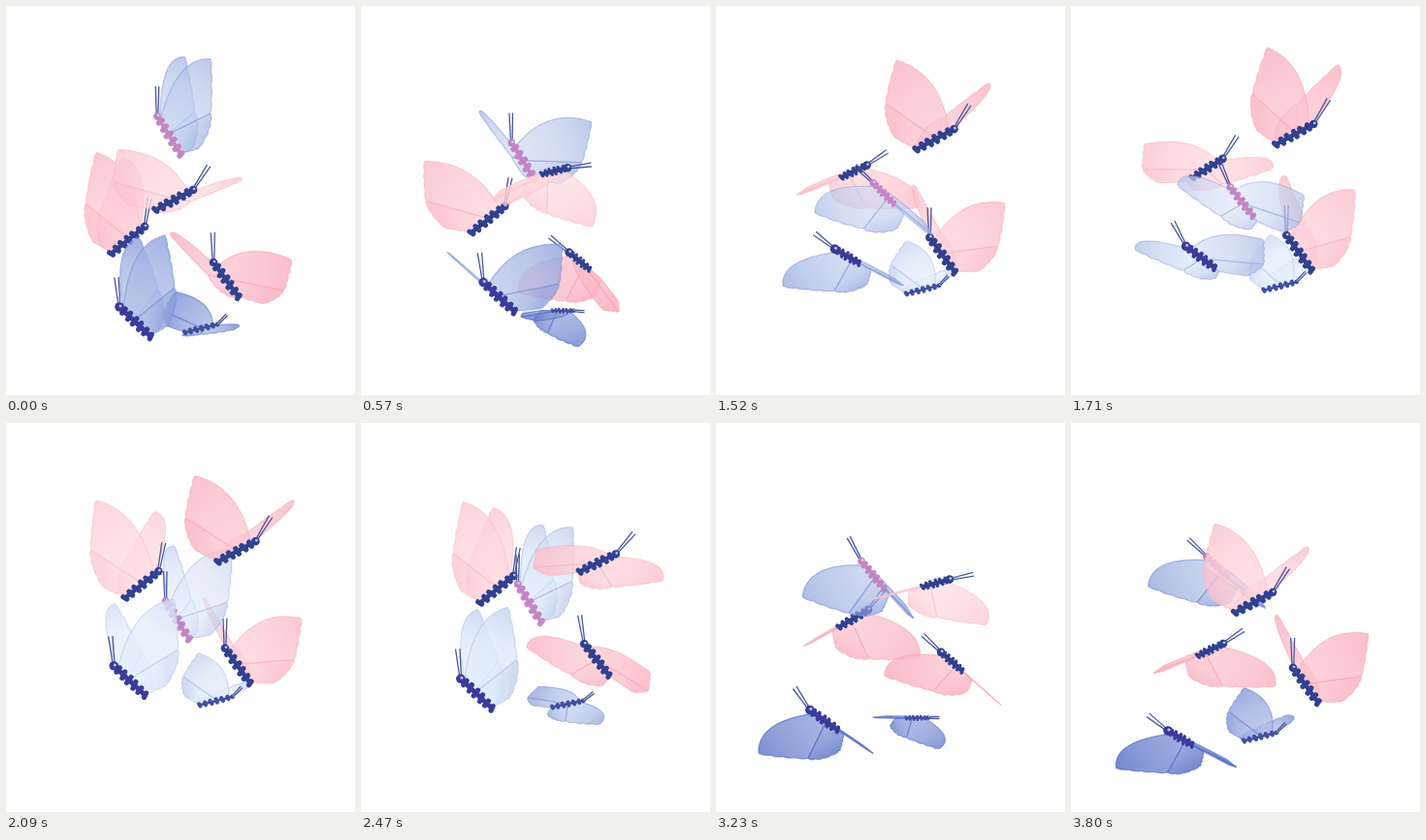
Write an HTML page with a canvas that moves like this. It is 360 px wide and 402 px high and loops after 3990 ms.

```html
<!DOCTYPE html>
<html lang="en">
<head>
<meta charset="utf-8">
<title>Butterflies</title>
<style>
  html, body { margin: 0; width: 100%; height: 100%; overflow: hidden; background: #fff; }
  canvas { display: block; width: 360px; height: 402px; }
</style>
</head>
<body>
<canvas id="stage" width="360" height="402"></canvas>
<script>
const ctx = document.getElementById('stage').getContext('2d');
const STEP = 190, STEPS = 21, BEAT = 12, TAU = Math.PI * 2;
const PINK = [[255, 228, 232], [246, 146, 166]];
const BLUE = [[228, 238, 251], [72, 98, 192]];
const NAVY = '#2f4190';

// Two ways of flapping: step of the highest point, mean angle and swing in radians.
const wide = { peak: 0.4, mean: 0.24, swing: 1.15 };
const calm = { peak: 9.4, mean: 0.08, swing: 0.93 };

// dir: side the tail points to. side and up: wing directions when flat and raised.
// path: head positions, five steps apart.
const flies = [
  { hue: BLUE, shade: 0.44, gain: 0.22, body: '#40509f', dir: -1, len: 36, slope: 0.25, width: 5,
    feeler: 14, lean: 0.75, beat: calm, side: [31, 19], up: [4, -40],
    path: [[218, 329], [221, 304], [234, 283], [224, 294], [212, 320]] },
  { hue: PINK, shade: 0.4, gain: 0.1, body: NAVY, dir: -1, len: 46, slope: 0.68, width: 9,
    feeler: 30, lean: 0.17, beat: wide, side: [64, 12], up: [-23, -72],
    path: [[143, 228], [152, 190], [157, 154], [157, 170], [157, 228]] },
  { hue: PINK, shade: 0.52, gain: 0.08, body: NAVY, dir: 1, len: 46, slope: 0.95, width: 9,
    feeler: 31, lean: 0, beat: calm, side: [63, 13], up: [29, -66],
    path: [[214, 265], [216, 247], [224, 235], [233, 228], [229, 253]] },
  { hue: BLUE, shade: 0.34, gain: 0.12, body: '#c485c4', dir: 1, len: 48, slope: 1.02, width: 8,
    feeler: 31, lean: 0, beat: wide, side: [63, 5], up: [32, -64], alpha: 0.68,
    path: [[156, 114], [156, 161], [165, 188], [157, 150], [140, 138]] },
  { hue: PINK, shade: 0.34, gain: -0.1, body: NAVY, dir: -1, len: 46, slope: 0.5, width: 9,
    feeler: 30, lean: 0.55, beat: calm, side: [64, 16], up: [4, -76],
    path: [[193, 190], [228, 150], [254, 120], [260, 150], [208, 175]] },
  { hue: BLUE, shade: 0.47, gain: 0.25, body: '#3a3b9a', dir: 1, len: 46, slope: 0.76, width: 10,
    feeler: 31, lean: 0.1, beat: wide, side: [64, -5], up: [21, -72],
    path: [[117, 311], [130, 268], [115, 248], [97, 280], [100, 318]] }
];

const clamp = v => Math.min(1, Math.max(0, v));
const mix = (p, q, k) => p.map((v, i) => v + (q[i] - v) * k);
const rgba = (c, a) => `rgba(${c.map(Math.round)},${a})`;

// Catmull-Rom curve through evenly spaced points.
function follow(path, u) {
  const i = Math.min(path.length - 2, Math.floor(u)), k = u - i;
  const at = n => path[Math.min(path.length - 1, Math.max(0, n))];
  const [a, b, c, d] = [at(i - 1), at(i), at(i + 1), at(i + 2)];
  return b.map((v, j) => v + 0.5 * k * (c[j] - a[j] +
    k * (2 * a[j] - 5 * v + 4 * c[j] - d[j] + k * (3 * (v - c[j]) + d[j] - a[j]))));
}

// Quadratic curve that passes through m halfway.
function arc(p, m, q) {
  ctx.quadraticCurveTo(2 * m[0] - (p[0] + q[0]) / 2, 2 * m[1] - (p[1] + q[1]) / 2, ...q);
}

// Wavy edge from p to q, bulging away from the root.
function scallop(p, q, root, bulge) {
  const n = 4, mid = mix(p, q, 0.5);
  const dx = mid[0] - root[0], dy = mid[1] - root[1], d = Math.hypot(dx, dy) || 1;
  const out = bulge * Math.hypot(q[0] - p[0], q[1] - p[1]);
  const at = (k, extra) => {
    const w = (out * 4 * k * (1 - k) + extra) / d, c = mix(p, q, k);
    return [c[0] + dx * w, c[1] + dy * w];
  };
  for (let i = 0; i < n; i++) ctx.quadraticCurveTo(...at((i + 0.5) / n, 2.2), ...at((i + 1) / n, 0));
}

function paint({ hue, alpha = 0.8 }, shade, from, to) {
  const tone = k => mix(...hue, clamp(shade + k));
  const g = ctx.createLinearGradient(...from, ...to);
  g.addColorStop(0, rgba(tone(-0.16), alpha - 0.06));
  g.addColorStop(0.6, rgba(tone(-0.06), alpha));
  g.addColorStop(1, rgba(tone(0.1), alpha));
  ctx.fillStyle = g;
  ctx.strokeStyle = rgba(tone(0.25), 0.55);
  ctx.lineWidth = 1.2;
  ctx.fill();
  ctx.stroke();
}

// A wing lies in the plane of the body axis and its span.
function drawWing(fly, shade, head, axis, span) {
  const at = (c, s) => head.map((v, i) => v + c * axis[i] + s * span[i]);
  const root = at(0.12, 0), waist = at(0.45, 0), rump = at(0.92, 0);
  const edge = at(-0.06, 0.58), tip = at(0.36, 1.03), notch = at(1.05, 0.64), lobe = at(1.25, 0.26);

  ctx.beginPath();
  ctx.moveTo(...waist);
  ctx.lineTo(...notch);
  scallop(notch, lobe, waist, 0.1);
  scallop(lobe, rump, waist, 0.04);
  ctx.closePath();
  paint(fly, shade, waist, lobe);

  ctx.beginPath();
  ctx.moveTo(...root);
  arc(root, edge, tip);
  scallop(tip, notch, root, 0.02);
  ctx.lineTo(...waist);
  ctx.closePath();
  paint(fly, shade, root, tip);
}

function line(p, q, width) {
  ctx.lineWidth = width;
  ctx.beginPath();
  ctx.moveTo(...p);
  ctx.lineTo(...q);
  ctx.stroke();
}

function dot([x, y], r) {
  ctx.beginPath();
  ctx.arc(x, y, r, 0, TAU);
  ctx.fill();
}

function drawBody({ body, width }, head, tail) {
  const n = 6, dx = tail[0] - head[0], dy = tail[1] - head[1], d = Math.hypot(dx, dy);
  ctx.strokeStyle = ctx.fillStyle = body;
  line(head, tail, width * 0.5);
  ctx.lineCap = 'round';
  for (let i = 0; i < n; i++) {
    const k = (i + 0.8) / n, c = mix(head, tail, k);
    const r = width * (0.22 + 0.14 * Math.sin(k * Math.PI)) / d;
    const slant = i % 2 ? 0.35 : 0.1;
    const ox = (-dy + dx * slant) * r, oy = (dx + dy * slant) * r;
    line([c[0] - ox, c[1] - oy], [c[0] + ox, c[1] + oy], d / n * 0.68);
  }
  ctx.lineCap = 'butt';
  dot(head, width * 0.48);
  ctx.fillStyle = 'rgba(225,232,250,.8)';
  dot([head[0] + 1, head[1] - 1], width * 0.15);
}

function drawFeelers(head, [fx, fy], width) {
  const d = Math.hypot(fx, fy);
  ctx.strokeStyle = '#4a569c';
  for (const s of [-1, 1]) {
    const shift = (k, w) => [head[0] + fx * k - fy / d * w * s, head[1] + fy * k + fx / d * w * s];
    line(shift(0, 0.8), shift(1, width * 0.22), 1.3);
  }
}

function draw(fly, step) {
  const { dir, beat, side, up, path, len } = fly;
  const phase = TAU * (step - beat.peak) / BEAT;
  const flap = beat.mean + beat.swing * Math.cos(phase);
  const lift = Math.sin(flap), spread = Math.cos(flap);
  // The head bows while the wings are down.
  const bow = ((1 + Math.cos(phase - TAU * 0.54)) / 2) ** 3;

  const head = follow(path, step / 5);
  const slope = fly.slope - 0.3 * bow;
  const axis = [dir * len * Math.cos(slope), len * Math.sin(slope)];
  const tail = head.map((v, i) => v + axis[i] * (1 - 0.45 * bow));
  const span = s => [s * spread * side[0] + lift * up[0],
                     s * spread * side[1] + (lift + 0.16) * up[1]];
  const shade = fly.shade + fly.gain * (Math.cos(TAU * (step - 20) / STEPS) - lift);

  drawWing(fly, shade, head, axis, span(-dir));
  drawWing(fly, shade, head, axis, span(dir));
  const lean = fly.lean + 1.05 * bow, reach = fly.feeler * (1 - 0.2 * bow);
  drawFeelers(head, [-dir * reach * Math.sin(lean), -reach * Math.cos(lean)], fly.width);
  drawBody(fly, head, tail);
}

ctx.lineJoin = 'round';
const start = performance.now();
let shown = -1;

function loop() {
  const step = Math.floor((performance.now() - start) / STEP) % STEPS;
  if (step !== shown) {
    shown = step;
    ctx.clearRect(0, 0, 360, 402);
    flies.forEach(fly => draw(fly, step));
  }
  requestAnimationFrame(loop);
}
loop();
</script>
</body>
</html>
```
